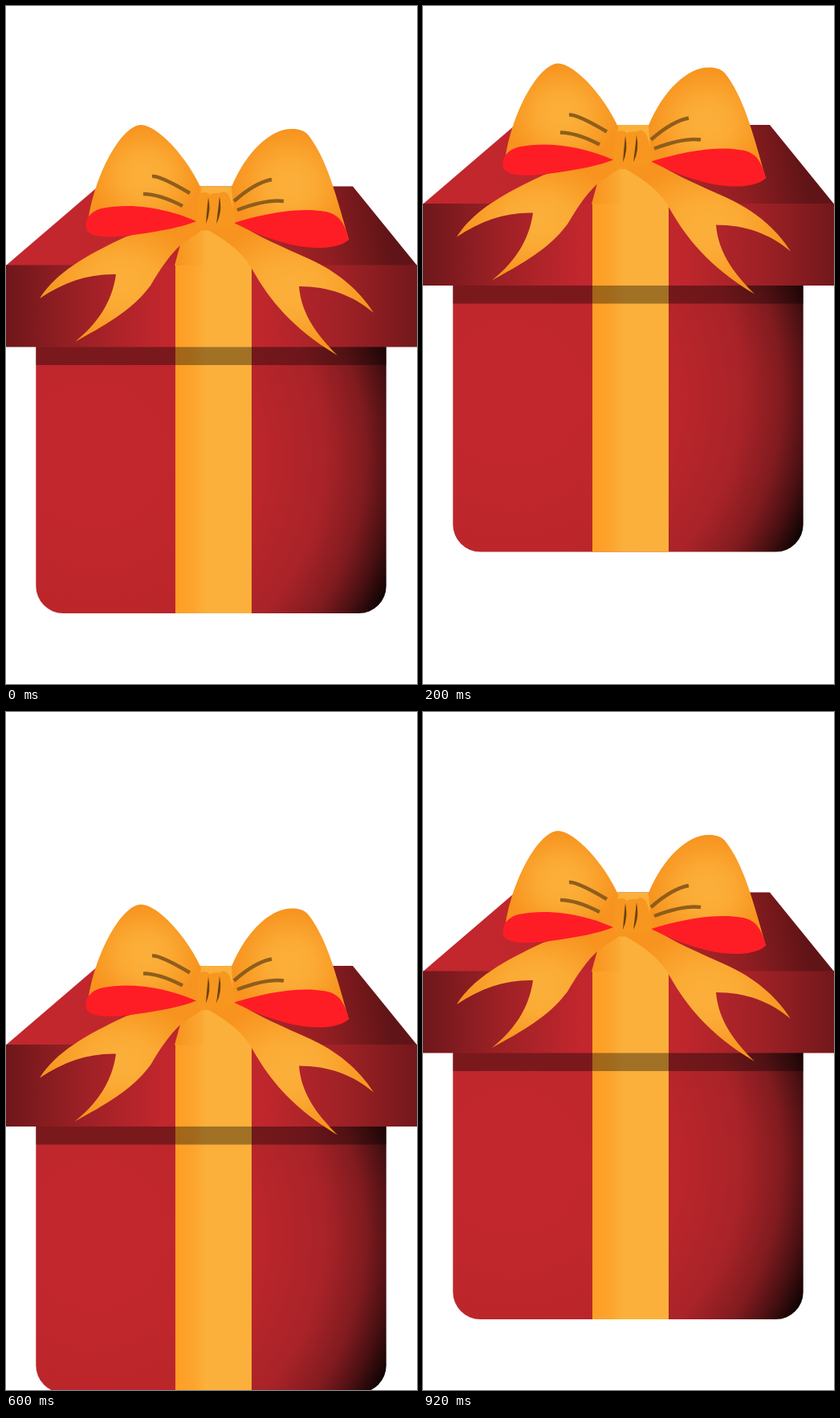
Write an HTML page that moves like this. It is 512 px wide and 844 px high and loops after 1 s.

```html
<!DOCTYPE html>
<html lang="en">
<head>
<meta charset="utf-8">
<title>Bouncing gift</title>
<style>
  html, body { margin: 0; width: 100%; height: 100%; overflow: hidden; background: #fff; }
  svg { display: block; width: 100%; height: 100%; }
</style>
</head>
<body>
<svg viewBox="0 0 512 844">
  <defs>
    <radialGradient id="box" gradientUnits="userSpaceOnUse" cx="110" cy="560" r="412">
      <stop offset=".2" stop-color="#c1272d"/>
      <stop offset=".5" stop-color="#bb262b"/>
      <stop offset=".7" stop-color="#a82328"/>
      <stop offset=".82" stop-color="#801b1f"/>
      <stop offset=".9" stop-color="#4a1012"/>
      <stop offset=".97" stop-color="#120404"/>
      <stop offset="1" stop-color="#000"/>
    </radialGradient>
    <linearGradient id="front" gradientUnits="userSpaceOnUse" x1="0" y1="0" x2="512" y2="0">
      <stop offset="0" stop-color="#6e171b"/>
      <stop offset=".18" stop-color="#9b2025"/>
      <stop offset=".38" stop-color="#c1272d"/>
      <stop offset=".62" stop-color="#c0272d"/>
      <stop offset=".82" stop-color="#9f2126"/>
      <stop offset="1" stop-color="#72181b"/>
    </linearGradient>
    <linearGradient id="top" gradientUnits="userSpaceOnUse" x1="90" y1="320" x2="470" y2="255">
      <stop offset="0" stop-color="#c1272d"/>
      <stop offset=".55" stop-color="#b8252b"/>
      <stop offset=".8" stop-color="#901e22"/>
      <stop offset="1" stop-color="#611417"/>
    </linearGradient>
    <linearGradient id="ribbon" gradientUnits="userSpaceOnUse" x1="211" y1="0" x2="306" y2="0">
      <stop offset="0" stop-color="#ff9d25"/>
      <stop offset=".23" stop-color="#fca42c"/>
      <stop offset=".4" stop-color="#fbb03b"/>
    </linearGradient>
    <linearGradient id="fold" gradientUnits="userSpaceOnUse" x1="211" y1="0" x2="248" y2="0">
      <stop offset="0" stop-color="#f7931e"/>
      <stop offset="1" stop-color="#fbab35"/>
    </linearGradient>
    <radialGradient id="gold">
      <stop offset="0" stop-color="#fbb03b"/>
      <stop offset=".4" stop-color="#fbab35"/>
      <stop offset="1" stop-color="#f7931e"/>
    </radialGradient>
  </defs>
  <g id="gift">
    <path fill="url(#box)" d="M37.300 424H473.700V722A34 34 0 0 1 439.700 756H71.300A34 34 0 0 1 37.300 722Z"/>
    <path fill="url(#top)" d="M115 224.500H432L512 323H0Z"/>
    <path fill="url(#front)" d="M0 322.500H512V424.500H0Z"/>
    <path fill="url(#ribbon)" d="M240 224.500H281L306 322.500V756H211V322.500Z"/>
    <path fill="#000" opacity=".36" d="M37.300 424.500H473.700V447H37.300Z"/>
    <path fill="url(#fold)" d="M210 323L219 290L246 274V323Z"/>

    <g fill="url(#gold)">
      <path d="M240 268C205 274 175 279 150 287C100 310 62 332 42 364C73 343 104 333 137 334C132 370 113 396 86 418C122 398 156 380 180 348C193 326 204 310 218 297L246 278Z"/>
      <path d="M250 278C277 293 297 309 308 330C328 365 356 401 413 435C389 411 368 385 365 349C402 349 432 360 458 382C439 352 411 330 378 315C345 300 315 288 286 269Z"/>
      <path d="M243 227C225 188 190 149 168 148C144 149 112 207 103 262V275L238 269Z"/>
      <path d="M281 225C300 180 331 152 357 153C365 153 371 155 376 160C400 190 412 238 427 291L284 270Z"/>
    </g>
    <g fill="#ff1d25">
      <path d="M237 268C197 250 153 245 119 252C101 257 97 270 101 280C110 290 139 288 166 284C194 280 220 275 237 268Z"/>
      <path d="M284 270C323 258 365 250 398 256C417 260 422 272 427 291C415 302 385 304 355 297C330 291 306 281 284 270Z"/>
    </g>
    <path fill="#f7971f" d="M239 237C244 230 250 231 254 235C260 231 265 235 270 231C278 232 279 238 281 245L287 267C282 276 270 280 262 275C254 281 245 281 238 277Z"/>

    <g fill="none" stroke="#8f5e1b" stroke-width="4.500">
      <path d="M182 212Q192 211 229 233"/>
      <path d="M171 234Q191 234 220 249"/>
      <path d="M284 243Q310 220 331 216"/>
      <path d="M288 254Q325 240 346 243"/>
    </g>
    <g fill="#6b430f">
      <path d="M252 238Q256 256 249 271Q250 256 252 238Z"/>
      <path d="M266 237Q270 256 262 271Q264 256 266 237Z"/>
    </g>
  </g>
</svg>
<script>
  const gift = document.getElementById("gift");
  const offsets = [0, -76.5, 0, 91.5, 0];
  const stepMs = 200;

  function draw(now) {
    const step = Math.floor(now / stepMs) % offsets.length;
    gift.setAttribute("transform", `translate(0 ${offsets[step]})`);
    requestAnimationFrame(draw);
  }
  draw(performance.now());
</script>
</body>
</html>
```
